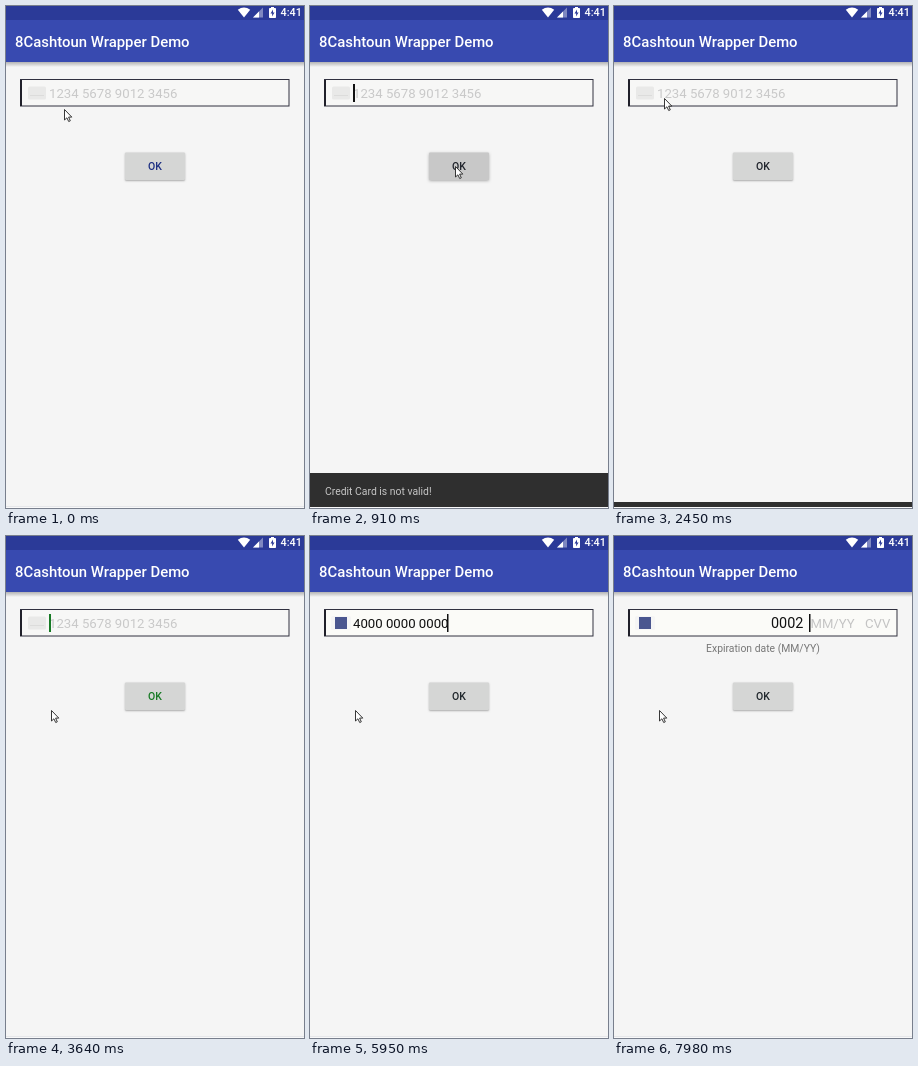
These frames come from a looping animation (298 by 502 pixels, 8 s). An HTML page with a canvas:

```html
<!DOCTYPE html>
<html lang="en">
<head>
<meta charset="utf-8">
<title>Card entry demo</title>
<style>
  html, body { margin: 0; width: 100%; height: 100%; overflow: hidden; background: #f5f5f5; }
  canvas { display: block; width: 298px; height: 502px; }
</style>
</head>
<body>
<canvas id="stage" width="298" height="502"></canvas>
<script>
const ctx = document.getElementById('stage').getContext('2d');
const LOOP = 8000;
const TICK = 70;
const NUMBER = '4000 0000 0000 0002';
const FONT = 'Roboto, "Noto Sans", sans-serif';

// Each track is a list of [start, value]; values hold until the next start.
const typedAt = [3780, 4200, 4480, 4620, 4760, 4900, 5040, 5250, 5460, 5530, 5670, 5950, 6370, 6720, 6930, 7770];
const caretTrack = [[0, 0], [420, 1], [1050, 0], [1540, 1], [2030, 0], [2800, 1], [3290, 0], [3640, 1], [7350, 0], [7770, 1]];
const inkTrack = [[0, '#1c2f82'], [490, '#20242c'], [3640, '#177a25'], [5460, '#20272c']];
const snackTrack = [[0, 502], [770, 490], [840, 473], [910, 467], [1050, 466], [2310, 470], [2380, 482], [2450, 496], [2520, 502]];
const snackTextTrack = [[0, 0], [840, 0.3], [910, 0.72], [1050, 0.95]];
const scrollTrack = [[0, 0], [7910, 0.6], [7980, 1]];
const moves = [
  { start: 0, end: 490, from: [58, 103], to: [145, 160] },
  { start: 1400, end: 2030, from: [145, 160], to: [50, 92] },
  { start: 3080, end: 3360, from: [50, 92], to: [45, 174] }
];

function at(track, t) {
  let value = track[0][1];
  for (const [start, v] of track) if (t >= start) value = v;
  return value;
}

function rect(x, y, w, h, color) {
  ctx.fillStyle = color;
  ctx.fillRect(x, y, w, h);
}

function round(x, y, w, h, r, color) {
  ctx.fillStyle = color;
  ctx.beginPath();
  ctx.roundRect(x, y, w, h, r);
  ctx.fill();
}

function poly(points, color) {
  ctx.fillStyle = color;
  ctx.beginPath();
  points.forEach(([x, y]) => ctx.lineTo(x, y));
  ctx.closePath();
  ctx.fill();
}

function text(str, x, y, size, color, weight = 400, align = 'left') {
  ctx.font = `${weight} ${size}px ${FONT}`;
  ctx.textAlign = align;
  ctx.fillStyle = color;
  ctx.fillText(str, x, y);
}

function drawHeader() {
  const shade = ctx.createLinearGradient(0, 56, 0, 61);
  shade.addColorStop(0, 'rgba(0,0,0,.27)');
  shade.addColorStop(1, 'rgba(0,0,0,0)');
  rect(0, 56, 298, 5, shade);
  rect(0, 0, 298, 14, '#2b3a98');
  rect(0, 14, 298, 42, '#384ab0');
  text('8Cashtoun Wrapper Demo', 9, 41, 14.9, '#fff', 500);

  // Wi-Fi, signal and battery
  ctx.fillStyle = '#fff';
  ctx.beginPath();
  ctx.moveTo(238, 11.5);
  ctx.lineTo(231.8, 3.8);
  ctx.quadraticCurveTo(238, -1, 244.2, 3.8);
  ctx.fill();
  poly([[257, 1.5], [257, 11.5], [247, 11.5]], 'rgba(255,255,255,.4)');
  poly([[253, 5.5], [253, 11.5], [247, 11.5]], '#fff');
  rect(265, 1, 3, 2, '#fff');
  round(263, 2, 7, 10, 0.8, '#fff');
  poly([[267, 3.5], [264.5, 7.5], [266.2, 7.5], [266, 10.5], [268.6, 6.5], [267, 6.5]], '#2b3a98');
  text('4:41', 274.5, 10.3, 10.8, '#fff', 500);
}

function drawCard(known) {
  if (known) {
    round(21, 80, 20, 14, 1.5, '#f5f5f5');
    rect(25, 81, 12, 12, '#4a568f');
  } else {
    round(22, 80.5, 18, 13, 1.5, '#e9e9e8');
    rect(24, 89, 14, 1, '#dcdcdb');
  }
}

function drawField(t) {
  const count = typedAt.filter(start => t >= start).length;
  const typed = NUMBER.slice(0, count + Math.floor(Math.max(0, count - 1) / 4));
  const scroll = at(scrollTrack, t);
  const caret = at(caretTrack, t);
  const caretColor = t >= 3640 && t < 3710 ? '#177a25' : '#111';

  rect(14, 74, 270, 26, count ? '#fbfbf8' : '#f7f7f6');
  ctx.strokeStyle = '#30303f';
  ctx.lineWidth = 1;
  ctx.strokeRect(14.5, 73.5, 268.5, 26.5);
  rect(14, 74, 2, 26, '#20202a');
  drawCard(count > 0);

  ctx.save();
  ctx.beginPath();
  ctx.rect(42, 75, 240, 24);
  ctx.clip();
  const x = 43 - 135 * scroll;
  text(typed || '1234 5678 9012 3456', x, 92, 13.2, count ? '#111' : '#c9c9c9');
  const end = x + (typed ? ctx.measureText(typed).width : 0);
  if (scroll) {
    const dx = 135 * (1 - scroll);
    text('0002', 157 + dx, 92, 14.4, '#111');
    text('MM/YY', 196.5 + dx, 92, 13.1, '#c4c4c4');
    text('CVV', 251 + dx, 92, 13.2, '#c4c4c4');
    rect(195 + dx, 78, 1.5, 18, '#111');
  } else if (caret) {
    rect(Math.round(end) - (count ? 1 : 0), 78, count ? 1.5 : 2, 18, caretColor);
  }
  ctx.restore();

  if (scroll) text('Expiration date (MM/YY)', 149, 116, 10.4, '#777', 400, 'center');
}

function drawButton(t) {
  const pressed = t >= 770 && t < 1120;
  ctx.save();
  ctx.shadowColor = 'rgba(0,0,0,.3)';
  ctx.shadowBlur = pressed ? 3 : 2;
  ctx.shadowOffsetY = 1;
  round(119, 146.5, 60, 27.5, 1, pressed ? '#c8c8c8' : '#d5d6d5');
  ctx.restore();
  text('OK', 149, 164, 10.5, at(inkTrack, t), 500, 'center');
}

function drawSnackbar(t) {
  const y = at(snackTrack, t);
  if (y < 500) {
    ctx.save();
    ctx.beginPath();
    ctx.rect(0, 0, 298, 501);
    ctx.clip();
    rect(0, y, 298, 502 - y, '#2f2f2f');
    ctx.globalAlpha = at(snackTextTrack, t);
    text('Credit Card is not valid!', 15, y + 22, 10.4, '#fff');
    ctx.restore();
  } else {
    rect(0, 500, 298, 1, '#e6e7ea');
  }
  rect(0, 501, 298, 1, '#f9f9fa');
}

function pointer(t) {
  let pos = moves[0].from;
  for (const { start, end, from, to } of moves) {
    if (t < start) break;
    const p = Math.min(1, (t - start) / (end - start));
    const k = p * p * (3 - 2 * p);
    pos = from.map((v, i) => Math.round(v + (to[i] - v) * k));
  }
  return pos;
}

function drawPointer(t) {
  const [x, y] = pointer(t);
  const shape = [[0, 0], [0, 10.5], [2.4, 8.3], [4.2, 12], [5.8, 11.3], [4.1, 7.6], [7.3, 7.6]];
  poly(shape.map(([dx, dy]) => [x + 0.5 + dx, y + 0.5 + dy]), '#fff');
  ctx.strokeStyle = '#222';
  ctx.lineWidth = 0.9;
  ctx.stroke();
}

function render(t) {
  rect(0, 0, 298, 502, '#f5f5f5');
  drawHeader();
  drawField(t);
  drawButton(t);
  drawSnackbar(t);
  drawPointer(t);
}

function loop() {
  const t = performance.now() % LOOP;
  render(Math.floor(t / TICK) * TICK);
  requestAnimationFrame(loop);
}
loop();
</script>
</body>
</html>
```
